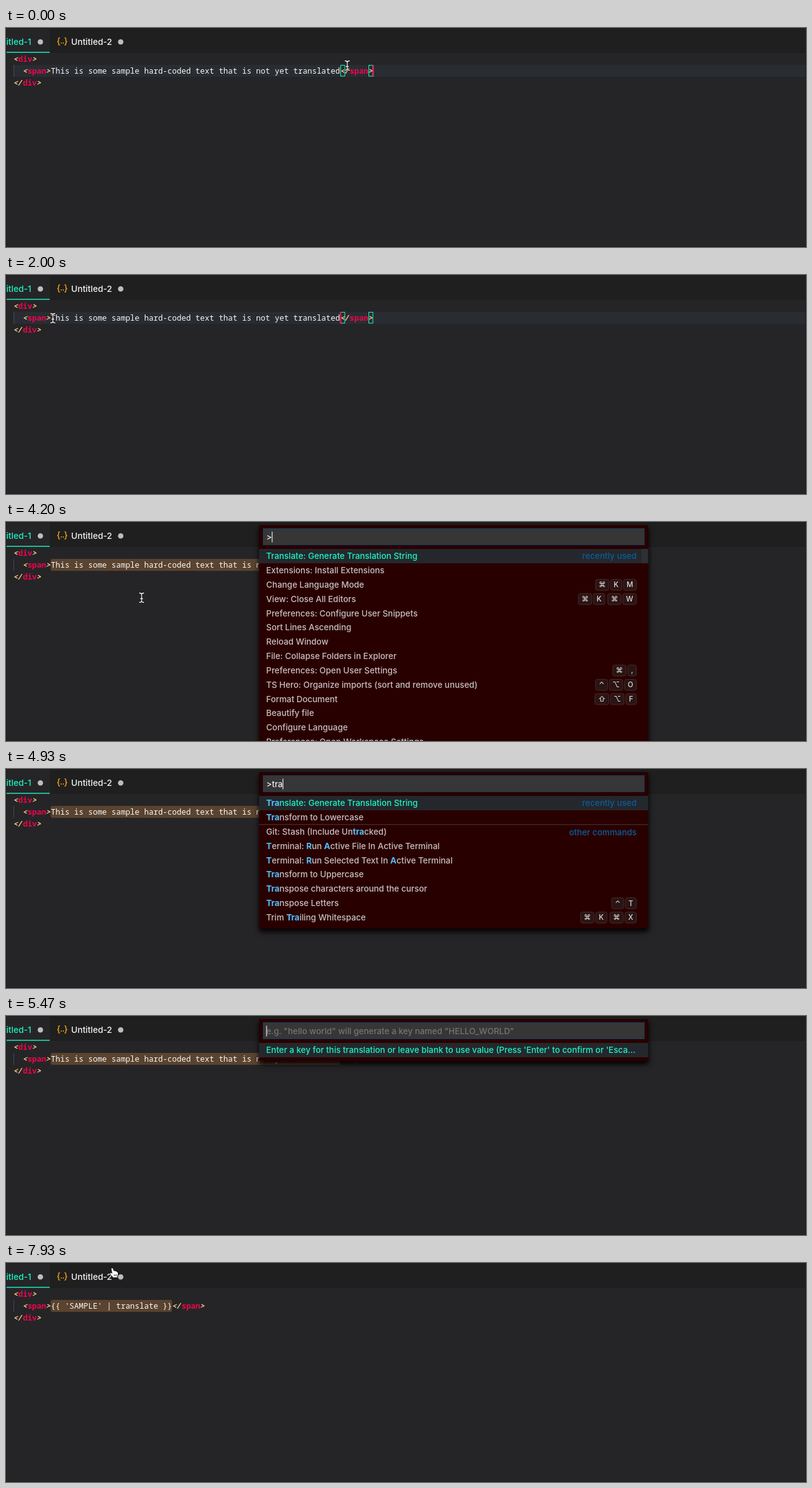
Animation, 1280 px wide and 350 px high, one loop 8000 ms. Source, as an HTML page with a canvas:

```html
<!DOCTYPE html>
<html lang="en">
<head>
<meta charset="utf-8">
<title>Translating a hard-coded string</title>
<style>
html, body { margin: 0; width: 100%; height: 100%; overflow: hidden; background: #252527; }
canvas { display: block; width: 1280px; height: 350px; }
</style>
</head>
<body>
<canvas id="stage"></canvas>
<script>
const W = 1280, H = 350, LOOP = 8000, STEP = 1000 / 15;
const canvas = document.getElementById('stage');
const ctx = canvas.getContext('2d');
const dpr = window.devicePixelRatio || 1;
canvas.width = W * dpr;
canvas.height = H * dpr;

const UI = "Inter, 'DejaVu Sans', sans-serif";
const MONO = "'Noto Sans Mono', 'DejaVu Sans Mono', monospace";
const UI_SIZE = 13.4, TAB_SIZE = 13.7, CODE_SIZE = 12.45, COL = CODE_SIZE * 0.6, CODE_X = 12;
const TEAL = '#1df5c4', PINK = '#f0054f', SAND = '#ffcb85', WHITE = '#f8f8f8', ORANGE = '#f9a41a';
const ROW = 22.83, FIRST_ROW = 54.5;
const SENTENCE = 'This is some sample hard-coded text that is not yet translated';
const RESULT = "{{ 'SAMPLE' | translate }}";

const ALL_COMMANDS = [
  ['Translate: Generate Translation String'],
  ['Extensions: Install Extensions'],
  ['Change Language Mode', '⌘KM'],
  ['View: Close All Editors', '⌘K ⌘W'],
  ['Preferences: Configure User Snippets'],
  ['Sort Lines Ascending'],
  ['Reload Window'],
  ['File: Collapse Folders in Explorer'],
  ['Preferences: Open User Settings', '⌘,'],
  ['TS Hero: Organize imports (sort and remove unused)', '⌃⌥O'],
  ['Format Document', '⇧⌥F'],
  ['Beautify file'],
  ['Configure Language'],
  ['Preferences: Open Workspace Settings']
];
// Square brackets mark the matched letters.
const TRA_COMMANDS = [
  ['[Tra]nslate: Generate Translation String'],
  ['[Tra]nsform to Lowercase'],
  ['Git: Stash (Include Un[tra]cked)'],
  ['[T]erminal: [R]un [A]ctive File In Active Terminal'],
  ['[T]erminal: [R]un Selected Text In [A]ctive Terminal'],
  ['[Tra]nsform to Uppercase'],
  ['[Tra]nspose characters around the cursor'],
  ['[Tra]nspose Letters', '⌃T'],
  ['Trim [Tra]iling Whitespace', '⌘K ⌘X']
];

function commandsFor(query) {
  if (query.length < 3) return ALL_COMMANDS;
  if (query.length === 3) return TRA_COMMANDS;
  const tail = 'trans'.slice(3, query.length);
  return TRA_COMMANDS.filter(([label]) => label.startsWith('[Tra]ns'))
    .map(([label, keys]) => [label.replace('[Tra]' + tail, '[Tra' + tail + ']'), keys]);
}

function rect(x, y, w, h, color) {
  ctx.fillStyle = color;
  ctx.fillRect(x, y, w, h);
}

function roundRect(x, y, w, h, r, fill, stroke) {
  ctx.beginPath();
  ctx.roundRect(x, y, w, h, r);
  if (fill) { ctx.fillStyle = fill; ctx.fill(); }
  if (stroke) { ctx.strokeStyle = stroke; ctx.lineWidth = 1; ctx.stroke(); }
}

function write(text, x, y, color, font, align = 'left') {
  ctx.font = font;
  ctx.textAlign = align;
  ctx.fillStyle = color;
  ctx.fillText(text, x, y);
  return ctx.measureText(text).width;
}

const uiFont = (weight = 500, size = UI_SIZE) => `${weight} ${size}px ${UI}`;
const ui = (text, x, y, color, align) => write(text, x, y, color, uiFont(), align);
const colX = col => CODE_X + col * COL;
const codeY = line => 54 + line * 18.75;

function code(text, col, line, color, style = '500') {
  write(text, colX(col), codeY(line), color, `${style} ${CODE_SIZE}px ${MONO}`);
}

function tag(name, col, line, closing) {
  const start = col + (closing ? 2 : 1);
  const bracket = (text, at) => code(text, at - 0.1, line, SAND, 'italic 600');
  bracket('<', col);
  if (closing) bracket('/', col + 0.9);
  code(name, start, line, PINK, '700');
  bracket('>', start + name.length);
}

function dot(x, y, r, color) {
  ctx.fillStyle = color;
  ctx.beginPath();
  ctx.arc(x, y, r, 0, Math.PI * 2);
  ctx.fill();
}

function drawTabs() {
  const font = uiFont(500, TAB_SIZE), braceFont = uiFont(500, 14);
  rect(0, 0, W, 40, '#1f1f1f');
  rect(0, 0, 70, 40, '#252527');
  rect(0, 38, 70, 1.6, '#1fdcb0');
  write('Untitled-1', 40.5, 26.8, TEAL, font, 'right');
  dot(55, 22.3, 4.3, '#bdbdbd');
  write('{', 81, 25.5, ORANGE, braceFont);
  write('}', 99, 25.5, ORANGE, braceFont, 'right');
  dot(88.4, 24, 0.9, ORANGE);
  dot(91.7, 24, 0.9, ORANGE);
  write('Untitled-2', 104.3, 26.8, '#f4f4f4', font);
  dot(183.5, 22.3, 4.3, '#bdbdbd');
}

function drawEditor(t) {
  const text = t >= 7000 ? RESULT : SENTENCE;
  const end = 8 + text.length;
  const selected = t >= 2070;
  if (!selected) rect(13, 59, W - 13, 19, '#292d32');
  rect(12, 59, 1, 19, '#414c55');
  if (selected) roundRect(colX(8) - 0.3, 59, text.length * COL, 19, 3, '#5a432f');

  tag('div', 0, 0);
  tag('span', 2, 1);
  code(text, 8, 1, WHITE);
  tag('span', end, 1, true);
  tag('div', 0, 2, true);

  if (!selected) {
    ctx.strokeStyle = TEAL;
    ctx.lineWidth = 1;
    for (const col of [end, end + 6]) ctx.strokeRect(Math.round(colX(col)) + 0.5, 59.5, 6.5, 17.5);
  }
  const caretOn = t < 1000 || (t >= 1530 && t < 2670) || (t >= 7000 && t < 7470);
  if (caretOn) {
    const col = selected ? 8 : t < 270 ? end + 7 : end;
    rect(colX(col) - 0.6, 59, 2, 19, '#f5165f');
  }
}

function drawKeys(keys, y) {
  let x = 1009;
  for (const key of [...keys].reverse()) {
    if (key === ' ') { x -= 2.2; continue; }
    ctx.font = uiFont(500, 11.4);
    const w = ctx.measureText(key).width + 11.2;
    x -= w;
    roundRect(x + 0.5, y - 8.5, w - 1, 17.5, 3, '#2b1414', '#442b2b');
    write(key, x + w / 2, y + 4.2, '#e2dcdc', uiFont(500, 11.4), 'center');
    x -= 1.6;
  }
}

function drawLabel(label, y, color) {
  let x = 416.3;
  label.split(/[[\]]/).forEach((part, i) => {
    const matched = i % 2 === 1;
    if (part) x += write(part, x, y, matched ? '#4fc1ff' : color, uiFont(matched ? 700 : 500));
  });
}

function drawPanel(rows, input, caret, placeholder) {
  const height = 38 + rows * ROW + 6.5;
  ctx.save();
  ctx.shadowColor = '#000';
  ctx.shadowBlur = 8 * dpr;
  ctx.shadowOffsetY = 5 * dpr;
  rect(405, 5, 622.5, height, '#290000');
  ctx.restore();
  rect(411, 10, 610.5, 27, '#363636');
  ctx.strokeStyle = '#0f3d5f';
  ctx.lineWidth = 1;
  ctx.strokeRect(411.5, 10.5, 609.5, 26);
  if (placeholder && !input) ui(placeholder, 416.5, 28.8, '#747474');
  const w = ui(input, 416.5, 28.8, '#ececec');
  if (caret) rect(416.3 + w, 15.5, 1.2, 17, '#e8e8e8');
  rect(405, 43, 622.5, 23, '#24282c');
}

function drawPalette(query, caret) {
  const list = commandsFor(query);
  drawPanel(list.length, '>' + query, caret);
  list.forEach(([label, keys], i) => {
    const y = FIRST_ROW + i * ROW;
    drawLabel(label, y + 4.8, i ? '#c9c0c0' : TEAL);
    if (keys) drawKeys(keys, y);
  });
  ui('recently used', 1009, 59.3, '#0d5c9a', 'right');
  if (list === ALL_COMMANDS) {
    rect(1017, 43, 10.5, 23, 'rgba(110,110,110,.12)');
  } else {
    rect(405, 88.3, 622.5, 1, '#4c3a3a');
    ui('other commands', 1009, 105.8, '#0d5c9a', 'right');
  }
}

function drawKeyPrompt(value, caret) {
  drawPanel(1, value, caret, 'e.g. "hello world" will generate a key named "HELLO_WORLD"');
  ui("Enter a key for this translation or leave blank to use value (Press 'Enter' to confirm or 'Esca...",
    416.3, 59.3, TEAL);
}

// Letters of the word typed by time t, at an even pace.
const typed = (word, start, gap, t) =>
  word.slice(0, Math.max(0, Math.floor((t - start) / gap + 1.05)));

function drawOverlay(t) {
  if (t >= 3070 && t < 5400) {
    const caret = t < 3530 || (t >= 4000 && t < 4470) || t >= 4670;
    drawPalette(typed('trans', 4670, 2 * STEP, t), caret);
  } else if (t >= 5470 && t < 6930) {
    drawKeyPrompt(typed('sample', 6000, 2 * STEP, t), t < 5930 || t >= 6000);
  }
}

// Pointer stops: time, x, y.
const STOPS = [
  [0, 546, 60], [70, 546, 60], [130, 541, 70], [600, 541, 70], [1400, 54, 63],
  [1470, 50, 62], [1800, 75, 69], [2070, 75, 69], [2270, 196, 137],
  [2400, 217, 121], [7400, 217, 121], [7930, 173, 15], [8000, 173, 15]
];

function pointerAt(t) {
  const i = Math.max(1, STOPS.findIndex(s => s[0] >= t));
  const [t0, x0, y0] = STOPS[i - 1], [t1, x1, y1] = STOPS[i];
  const p = (t - t0) / (t1 - t0), e = p * p * (3 - 2 * p);
  return [x0 + (x1 - x0) * e, y0 + (y1 - y0) * e];
}

function drawBeam(x, y) {
  const path = new Path2D('M-3.5-7.5Q-.5-7.5 0-5.5Q.5-7.5 3.5-7.5M0-5.5V5.5M-3.5 7.5Q-.5 7.5 0 5.5Q.5 7.5 3.5 7.5M-1.8 1.5H1.8');
  ctx.save();
  ctx.translate(x, y);
  ctx.lineCap = 'round';
  for (const [color, width] of [['#151515', 2.8], ['#f2f2f2', 1.3]]) {
    ctx.strokeStyle = color;
    ctx.lineWidth = width;
    ctx.stroke(path);
  }
  ctx.restore();
}

function drawHand(x, y) {
  const path = new Path2D('M-4.5-6Q-3.2-7.8-1.8-5.8L-.4-2Q.8-3 2-1.7Q3.4-2.3 4.2-.8Q5.8-.8 6 1L6 4.5L4.5 8H-1.5L-5.5 3.2Q-6.8 1-4.8.8L-2.8 2Z');
  ctx.save();
  ctx.translate(x, y);
  ctx.lineJoin = 'round';
  ctx.strokeStyle = '#111';
  ctx.lineWidth = 1.6;
  ctx.stroke(path);
  ctx.fillStyle = '#fff';
  ctx.fill(path);
  ctx.lineWidth = 0.7;
  ctx.stroke(new Path2D('M.2 3V6M2.2 3V6M4.1 3V6'));
  ctx.restore();
}

function drawPointer(t) {
  if (t >= 4670 && t < 7470) return;
  const [x, y] = pointerAt(t);
  (y < 40 ? drawHand : drawBeam)(x, y);
}

function render(now) {
  const frame = Math.floor((now % LOOP + 4) / STEP) % Math.round(LOOP / STEP);
  const t = Math.round(frame * STEP / 10) * 10;
  ctx.setTransform(dpr, 0, 0, dpr, 0, 0);
  rect(0, 0, W, H, '#252527');
  drawTabs();
  drawEditor(t);
  ctx.strokeStyle = '#1b1b1c';
  ctx.lineWidth = 1;
  ctx.strokeRect(0.5, 0.5, W - 1, H - 1);
  drawOverlay(t);
  drawPointer(t);
}

const begin = performance.now();
function tick() {
  render(performance.now() - begin);
  requestAnimationFrame(tick);
}
tick();
</script>
</body>
</html>
```
